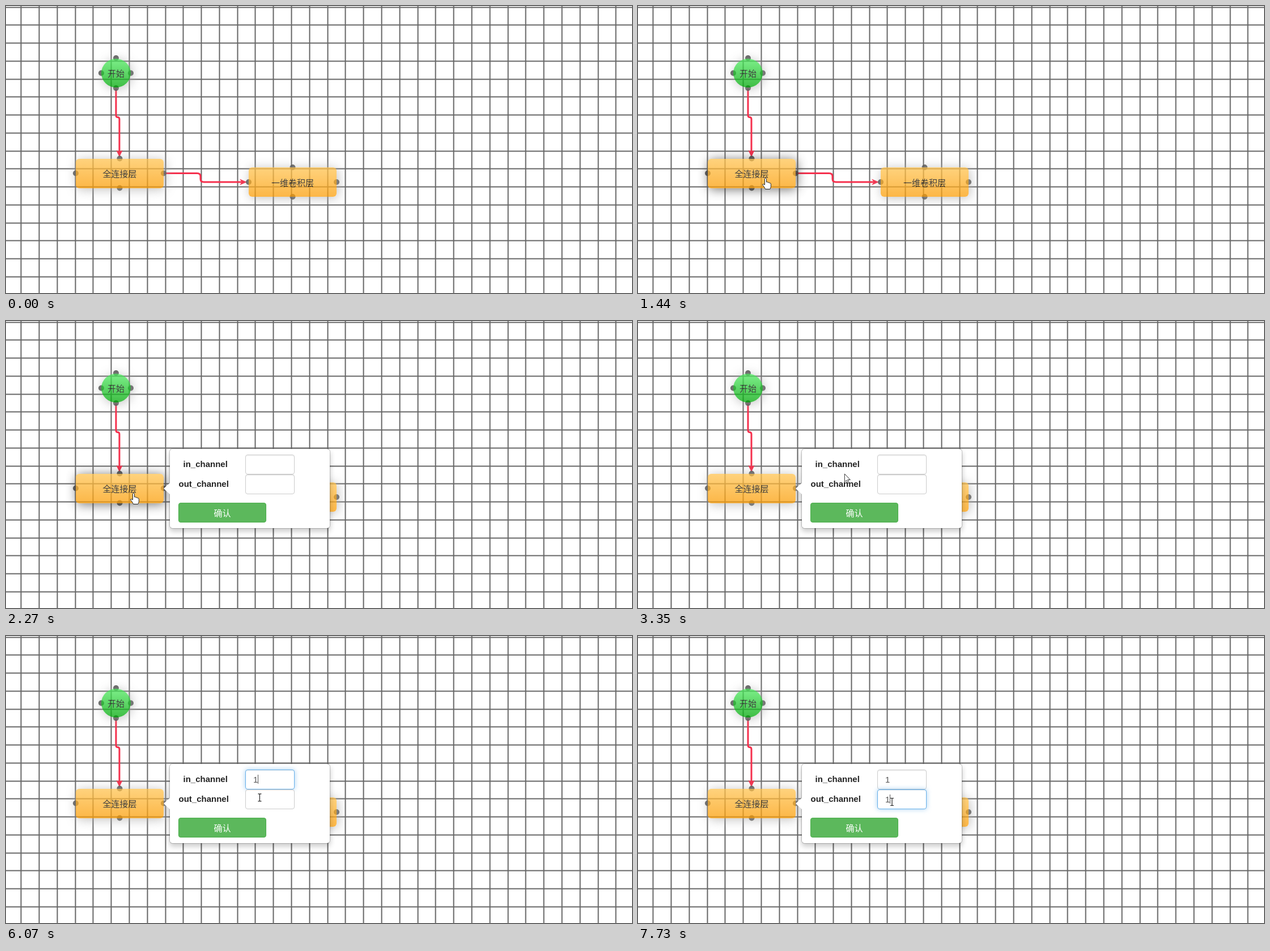
An HTML page for the animation above (8000 ms loop, 1104 px wide and 507 px high).

```html
<!DOCTYPE html>
<html lang="zh">
<head>
<meta charset="utf-8">
<style>
html, body { margin: 0; width: 100%; height: 100%; overflow: hidden; background: #fff; }
body { position: relative; font: 15px "Liberation Sans", Arial, sans-serif; color: #333; }
svg { position: absolute; left: 0; top: 0; width: 1104px; height: 507px; }
div { position: absolute; box-sizing: border-box; }
.node, .btn {
  display: flex; align-items: center; justify-content: center;
  font: 300 15px "Noto Sans CJK SC", "Noto Sans CJK", sans-serif;
}
.node {
  width: 155px; height: 52px; border-radius: 6px; color: #000; opacity: .75;
  background: linear-gradient(#ffc452, #fc9f0a); box-shadow: 2px 2px 19px #aaa;
}
.start {
  width: 52px; height: 51px; border-radius: 50%;
  background: linear-gradient(#52eb63, #00a808);
}
.hover { box-shadow: 2px 2px 19px #444; }
.pop {
  left: 288px; top: 224.5px; width: 284px; height: 142px; background: #fff;
  border: 1px solid rgba(0,0,0,.2); background-clip: padding-box;
  border-radius: 6px; box-shadow: 0 5px 10px rgba(0,0,0,.2);
}
.tip {
  left: 278px; top: 285.5px; border: 10px solid transparent;
  border-right: 11px solid #fff; border-left: 0;
}
.label { font-weight: bold; line-height: 18px; color: #222; }
.input {
  --f: 0; left: 422px; width: 87px; height: 35px; border-radius: 4px;
  padding-left: 13px; line-height: 33px; color: #555; background: #fff;
  border: 1px solid color-mix(in srgb, #66afe9 calc(var(--f) * 100%), #ccc);
  box-shadow: inset 0 1px 1px rgba(0,0,0,.075), 0 0 8px rgba(102,175,233,calc(.6 * var(--f)));
}
.caret { width: 1px; height: 16px; background: #555; }
.btn {
  left: 304px; top: 321px; width: 155px; height: 35px; border-radius: 4px;
  color: #fff; background: #5cb85c; border: 1px solid #4cae4c;
}
</style>
</head>
<body>
<svg>
  <path id="grid" stroke="#676767" stroke-width="2"/>
  <g fill="none" stroke="#f5304d" stroke-width="3">
    <path d="M194 145V193Q194 196.500 197 196.500T200 200V258"/>
    <path d="M278 295.500H337Q343 295.500 343 301V305.500Q343 311 349 311H417"/>
  </g>
  <g fill="#f5304d">
    <path d="M200 267l-5.500-12 5.500 2 5.500-2z"/>
    <path d="M425 311l-13-5.500 4 5.500-4 5.500z"/>
  </g>
  <g id="dots" fill="#444" fill-opacity=".85"></g>
</svg>
<div class="node start" style="left:168px;top:93px">开始</div>
<div class="node" id="dense" style="left:123px;top:269.500px">全连接层</div>
<div class="node" style="left:428px;top:285px">一维卷积层</div>

<div id="form" style="inset:0">
  <div class="pop"></div>
  <div class="tip"></div>
  <div class="label" style="left:312.500px;top:244px">in_channel</div>
  <div class="label" style="left:304.500px;top:279px">out_channel</div>
  <div class="input" id="in" style="top:236px"></div>
  <div class="input" id="out" style="top:271px"></div>
  <div class="btn">确认</div>
  <div class="caret" id="caret"></div>
</div>

<svg id="cursor">
  <path id="arrow" fill="#fff" stroke="#333" d="M0 0V14.500L3.300 11.400 5.700 17 7.900 16 5.500 10.600H10z"/>
  <path id="hand" fill="#fff" stroke="#222" d="M-1.500 11V1.500a1.500 1.500 0 0 1 3 0V7q3-.6 3.300 1 2.400-.4 2.600.9 2-.2 2 1.600v4q0 2-1.600 5H-.5q-.8-2.600-3-5.200-2.400-2.500-1.600-3.400 1.400-1 3.600 1z"/>
  <path id="beam" fill="none" stroke="#222" stroke-width="1.200" d="M-3-6.500H-1Q0-6.500 0-5.500 0-6.500 1-6.500H3M0-5.500V5.500M-3 6.500H-1Q0 6.500 0 5.500 0 6.500 1 6.500H3"/>
</svg>

<script>
const LOOP = 8000;
const $ = id => document.getElementById(id);
const ramp = (t, a, b) => Math.min(1, Math.max(0, (t - a) / (b - a)));
const within = (v, a, b) => v >= a && v < b;
const easeOut = p => 1 - (1 - p) ** 2;
const linear = p => p;

// Grid lines sit on whole pixels
const snap = v => Math.floor(v) + 0.5;
let lines = '';
for (let x = 26.65; x < 1104; x += 31.795) lines += `M${snap(x)} 0V507`;
for (let y = 2; y < 507; y += 31.765) lines += `M0 ${snap(y)}H1104`;
$('grid').setAttribute('d', lines);

// Anchor dots on the four sides of each node: centre and half sizes
const nodes = [[194, 118.5, 26, 26.5], [200.5, 295.5, 77.5, 26], [505.5, 311, 77.5, 26]];
$('dots').innerHTML = nodes.map(([x, y, w, h]) =>
  [[0, -h], [w, 0], [0, h], [-w, 0]].map(([dx, dy]) =>
    `<circle cx="${x + dx}" cy="${y + dy}" r="5"/>`).join('')).join('');

// Pointer moves: start, end, from, to, easing
const moves = [
  [460, 1240, [943, 486], [207, 317], easeOut],
  [1270, 1440, [207, 317], [225, 304], easeOut],
  [3020, 3350, [225, 304], [364, 270], linear],
  [3350, 3820, [364, 270], [438, 257], easeOut],
  [3850, 4140, [438, 257], [445, 253], easeOut],
  [5840, 6250, [445, 253], [448, 293], easeOut]
];

function pointer(t) {
  const [a, b, from, to, ease] = moves.filter(m => t >= m[0]).pop() || moves[0];
  const p = ease(ramp(t, a, b));
  return from.map((v, i) => v + (to[i] - v) * p);
}

function draw(t) {
  const [x, y] = pointer(t);
  const onNode = t >= 460 && within(x, 123, 278) && within(y, 269, 322);
  const onInput = t > 3020 && within(x, 423, 509);
  const shape = onNode ? 'hand' : onInput ? 'beam' : 'arrow';
  for (const id of ['arrow', 'hand', 'beam']) {
    $(id).style.display = id === shape ? '' : 'none';
    $(id).setAttribute('transform', `translate(${x} ${y})`);
  }
  $('cursor').style.display = t < 460 ? 'none' : '';
  $('dense').classList.toggle('hover', onNode);
  $('form').style.opacity = ramp(t, 1960, 2270) ** 1.8;

  const second = ramp(t, 6640, 6830);
  $('in').style.setProperty('--f', ramp(t, 3970, 4140) * (1 - second));
  $('out').style.setProperty('--f', second);
  $('in').textContent = t >= 5190 ? '1' : '';
  $('out').textContent = t >= 7620 ? '1' : '';

  const inOut = t >= 6690;
  const since = t - (inOut ? 6690 : 3990);
  const lit = since >= 0 && since % 1040 < 520 && !within(t, 6590, 6690);
  const typed = t >= (inOut ? 7620 : 5190);
  const caret = $('caret').style;
  caret.display = lit ? '' : 'none';
  caret.left = (typed ? 444 : 436) + 'px';
  caret.top = (inOut ? 280 : 245) + 'px';
}

function tick() {
  draw(performance.now() % LOOP);
  requestAnimationFrame(tick);
}
tick();
</script>
</body>
</html>
```
